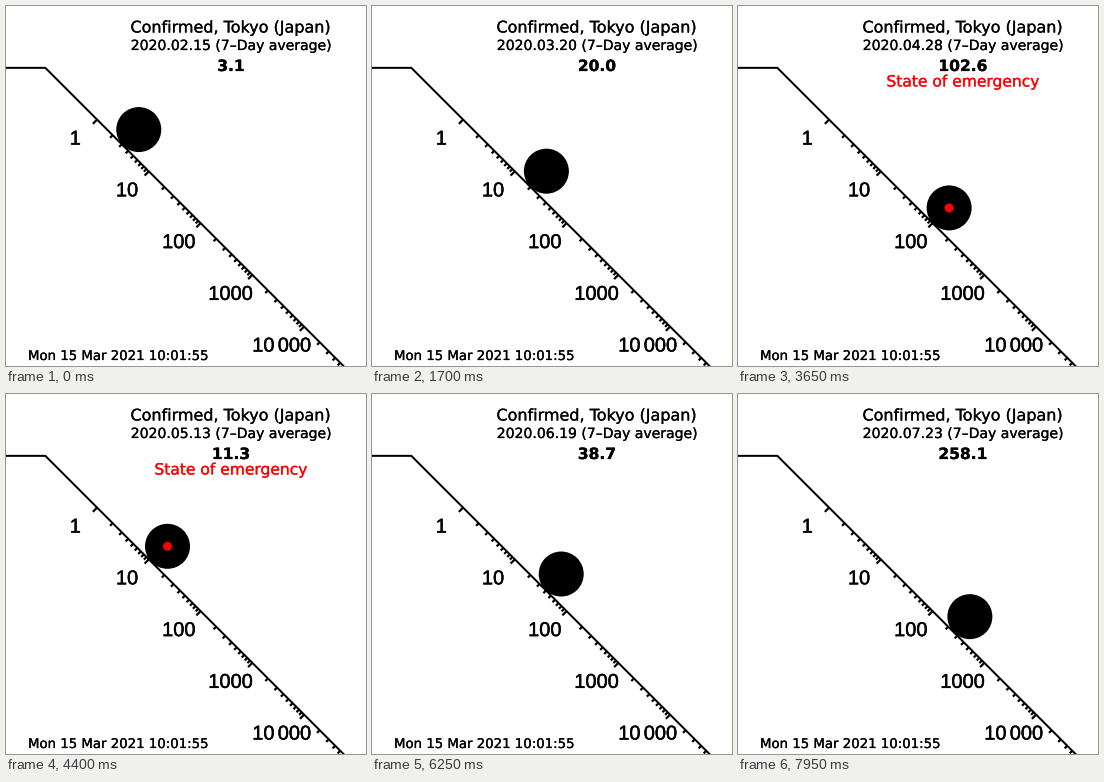
These frames come from a looping animation (360 by 360 pixels, 8000 ms). A matplotlib script:

```python
import numpy as np
import matplotlib.pyplot as plt
from matplotlib.animation import FuncAnimation
from matplotlib.patches import Circle
from matplotlib.patheffects import withStroke

SIZE = 360
DAYS = 160                # one frame per day
DECADE = 51.75            # pixels per power of ten along x and y
ONE = (91.1, 113.6)       # where the value 1 sits on the slope
CORNER = (ONE[0] - DECADE, ONE[1] - DECADE)
BALL = (107.05, 97.85)    # ball centre for the value 1
RADIUS = 22.5
START = np.datetime64("2020-02-15")
EMERGENCY = (np.datetime64("2020-04-07"), np.datetime64("2020-05-25"))

# Turning points of the curve: day -> cases in that week
TURNS = {0: 22, 2: 9, 10: 7, 15: 27, 17: 25, 21: 19, 30: 48, 34: 140,
         37: 293, 51: 1082, 53: 1169, 68: 664, 73: 718, 76: 620, 81: 203,
         85: 128, 92: 41, 104: 127, 113: 128, 118: 228, 125: 271, 132: 362,
         142: 1162, 153: 1775, 159: 1807}


def weekly_average(day):
    """Exponential growth between turning points, in whole cases per week."""
    logs = np.log(list(TURNS.values()))
    return np.round(np.exp(np.interp(day, list(TURNS), logs))) / 7


fig = plt.figure(figsize=(SIZE / 72, SIZE / 72), dpi=72, facecolor="white")
ax = fig.add_axes([0, 0, 1, 1])
ax.set_xlim(0, SIZE)
ax.set_ylim(SIZE, 0)
ax.axis("off")


def on_slope(value, origin):
    step = DECADE * np.log10(value)
    return origin[0] + step, origin[1] + step


def label(x, y, text, size, ha="center", font="DejaVu Sans", color="black",
          edge=0.25, **kw):
    return ax.text(x, y, text, fontsize=size, ha=ha, va="baseline",
                   family=font, color=color,
                   path_effects=[withStroke(linewidth=edge, foreground=color)],
                   **kw)


def tick(value, length):
    x, y = on_slope(value, ONE)
    d = length / np.sqrt(2)
    ax.plot([x, x - d], [y, y + d], color="black", lw=2.2,
            solid_capstyle="butt")


# Slope with its logarithmic scale
ax.plot([-5, CORNER[0], CORNER[0] + 320], [CORNER[1], CORNER[1], CORNER[1] + 320],
        color="black", lw=2, solid_joinstyle="miter")
for power, name in enumerate(["1", "10", "100", "1000", r"10$\,$000"]):
    base = 10 ** power
    x, y = on_slope(base, ONE)
    label(x - 21.8, y + 25, name, 20, font="Liberation Sans", edge=0.45)
    tick(base, 6)
    for k in range(2, 10):
        tick(k * base, 3.7)

label(225, 26.5, "Confirmed, Tokyo (Japan)", 16)
label(22, 354, "Mon 15 Mar 2021 10:01:55", 13.3, ha="left")
date_text = label(225, 44, "", 14)
value_text = label(225, 65, "", 15.5, weight="bold")
alert_text = label(225, 80.5, "State of emergency", 15.5, color="red")

ball = ax.add_patch(Circle(BALL, RADIUS, fc="black", ec="none", zorder=3))
dot = ax.add_patch(Circle(BALL, 4.5, fc="red", ec="none", zorder=4))


def update(i):
    day = START + i
    value = weekly_average(i)
    ball.center = dot.center = on_slope(value, BALL)
    date_text.set_text(str(day).replace("-", ".") + " (7\u2013Day average)")
    value_text.set_text(f"{value:.1f}")
    alert = bool(EMERGENCY[0] <= day <= EMERGENCY[1])
    alert_text.set_visible(alert)
    dot.set_visible(alert)
    return ball, dot, date_text, value_text, alert_text


anim = FuncAnimation(fig, update, frames=DAYS, interval=50,
                     repeat=True, repeat_delay=0, blit=False)
plt.show()
```
